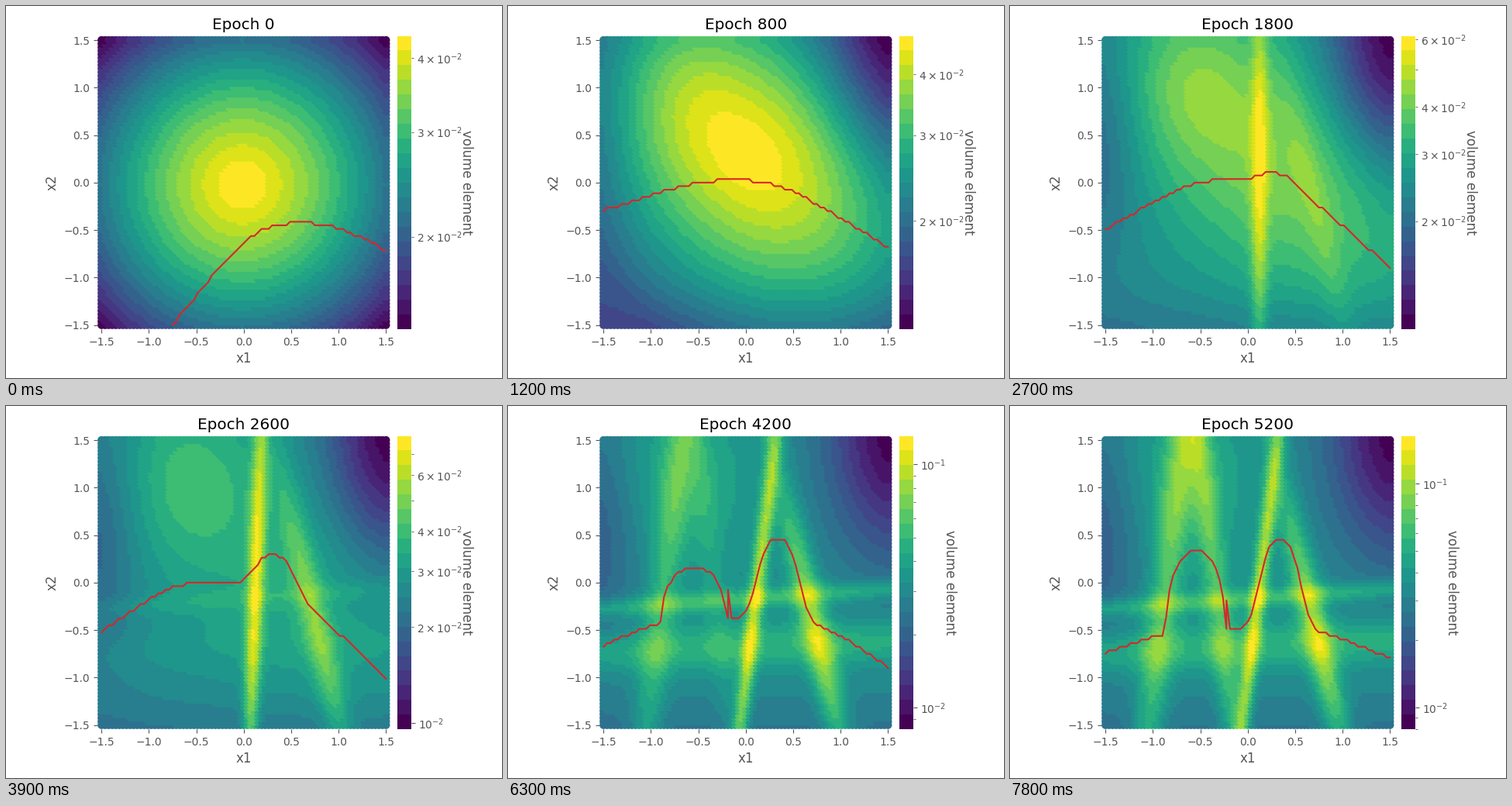
Write a matplotlib script that moves like this. It is 640 px wide and 480 px high and loops after 8000 ms.

```python
import numpy as np
import matplotlib.pyplot as plt
from matplotlib.animation import FuncAnimation
from matplotlib.patches import Rectangle

plt.style.use("ggplot")
plt.rcParams.update({"axes.facecolor": "white", "figure.facecolor": "white",
                     "axes.grid": False, "font.family": "DejaVu Sans"})

W, H, DPI = 640, 480, 100
LEVELS = 20
LAST_STEP = 26
axis = np.linspace(-1.5, 1.5, 81)
gap = axis[1] - axis[0]
X, Y = (g.ravel() for g in np.meshgrid(axis, axis))
cmap = plt.get_cmap("viridis", LEVELS)


def rise(step, start, end):
    t = np.clip((step - start) / (end - start), 0, 1)
    return t * t * (3 - 2 * t)


def bump(distance, width):
    return np.exp(-.5 * (distance / width) ** 2)


def softplus(x, softness=.15):
    return softness * np.log1p(np.exp(x / softness))


def cone(step):
    """Round starting peak that drifts upwards and tilts."""
    move = min(step / 2, 1)
    dy = Y - .25 * move
    r2 = X ** 2 + dy ** 2 + .5 * move * X * dy
    return np.maximum(1 - .6 * (r2 / 2.25) ** .7, 0)


def landscape(step):
    """Smooth ground with a fading hill and a dark upper right corner."""
    height = np.interp(step, [6, 13, 21], [.46, .13, 0])
    u, v = X - .3 - .2 * rise(step, 6, 13), Y - .25
    hill = height * np.exp(-.5 * u ** 2 - .5 * v ** 2 - .38 * u * v)
    ground = (.48 + .14 * bump(X + .6, .45) * bump(Y - 1.1, .6)
              - .17 * bump(X + 1.6, .35) * bump(Y - .5, .9)
              - .1 * bump(Y + 1.7, .35))
    corner = bump(X - 1.6, .5) * bump(Y - 1.6, .9)
    return (ground + hill) * (1 - .97 * corner)


def ridges(step):
    lean = .125 * rise(step, 8, 22)
    place = .68 - .06 * rise(step, 13, 26)
    steep = .38 * rise(step, 5, 12) * bump(Y + .2, 2) * bump(X - .14 - lean * Y, .06)
    slanted = .34 * rise(step, 5, 18) * bump(Y + .5, 1.1) * bump(X - place + .23 * Y, .11)
    flat = .18 * rise(step, 9, 20) * bump(Y + .15 - .07 * X, .075)
    low = .16 * rise(step, 10, 22) * bump(Y + .65 - .04 * X, .17)
    left = .22 * rise(step, 13, 25) * bump(X + .85 - .12 * Y, .12)
    middle = .2 * rise(step, 18, 26) * bump(X + .32 + .12 * Y, .1)
    return steep + slanted + flat + low + left + middle


def field(step):
    mix = min(step / 7, 1)
    z = (1 - mix) * cone(step) + mix * landscape(step) + ridges(step)
    return np.clip(z / min(z.max(), 1), 0, 1)


def boundary(step):
    """A soft arch with two growing humps, snapped to the grid."""
    def at(*values):
        return np.interp(step, [0, 2, 6, 13, 21, 26], values)

    x = axis
    y = (at(-.41, 0, .07, .01, -.37, -.48)
         - at(1.25, .14, .5, .7, .45, .35) * softplus(at(.12, -.5, -.45, -.75, -.85, -.75) - x)
         - at(.55, .41, .8, .98, .7, .42) * softplus(x - at(.95, .22, .42, .45, .75, .75)))
    y = y + .94 * rise(step, 5, 25) * np.exp(-(abs(x - .34) / .25) ** 3)
    width = .335 - .025 * rise(step, 21, 26)
    inside = np.maximum(1 - ((x + .555) / width) ** 2, 0)
    y = y + .84 * rise(step, 12, 27) * inside ** .4
    if step >= 19:  # the steep edge is crossed twice
        edge = np.searchsorted(x, width - .555)
        x = np.insert(x, edge + 1, x[edge])
        y = np.insert(y, edge + 1, y[edge] + .28)
    return x, np.where(y < -1.5, np.nan, np.round(y / gap) * gap)


def bar_limits(step):
    keys = [0, 6, 13, 21, 26]
    low = np.interp(step, keys, [-1.855, -1.955, -2.02, -2.089, -2.0985])
    high = np.interp(step, keys, [-1.361, -1.298, -1.098, -.883, -.786])
    return 10 ** low, 10 ** high


def place_axes(left, right, upper=38.5, lower=417.2):
    ax = fig.add_axes([left / W, 1 - lower / H,
                       (right - left) / W, (lower - upper) / H])
    for spine in ax.spines.values():
        spine.set_visible(False)
    return ax


fig = plt.figure(figsize=(W / DPI, H / DPI), dpi=DPI)
ax = place_axes(117.8, 495.8)
dots = ax.scatter(X, Y, c=field(0), s=56, linewidths=0, cmap=cmap, vmin=0, vmax=1)
line, = ax.plot([], [], color="tab:red", lw=1.5)
ticks = np.arange(-1.5, 1.6, .5)
ax.set(xlim=(-1.545, 1.545), ylim=(-1.545, 1.545), xticks=ticks, yticks=ticks,
       xlabel="x1", ylabel="x2")
title = ax.set_title("Epoch 0")

bar = place_axes(505.3, 522.7)
bar.set_yscale("log")
bar.set_xticks([])
bar.yaxis.tick_right()
bar.yaxis.set_label_position("right")
bar.set_ylabel("volume element", rotation=270, labelpad=10)
for k in range(LEVELS):
    bar.add_patch(Rectangle((0, k / LEVELS), 1, 1 - k / LEVELS, lw=0,
                            color=cmap(k), transform=bar.transAxes))


def update(frame):
    step = min(frame // 3, LAST_STEP)
    dots.set_array(field(step))
    line.set_data(*boundary(step))
    title.set_text(f"Epoch {200 * step}")
    bar.set_ylim(*bar_limits(step))


animation = FuncAnimation(fig, update, frames=80, interval=100,
                          init_func=lambda: update(0), repeat=True, repeat_delay=0)
plt.show()
```
